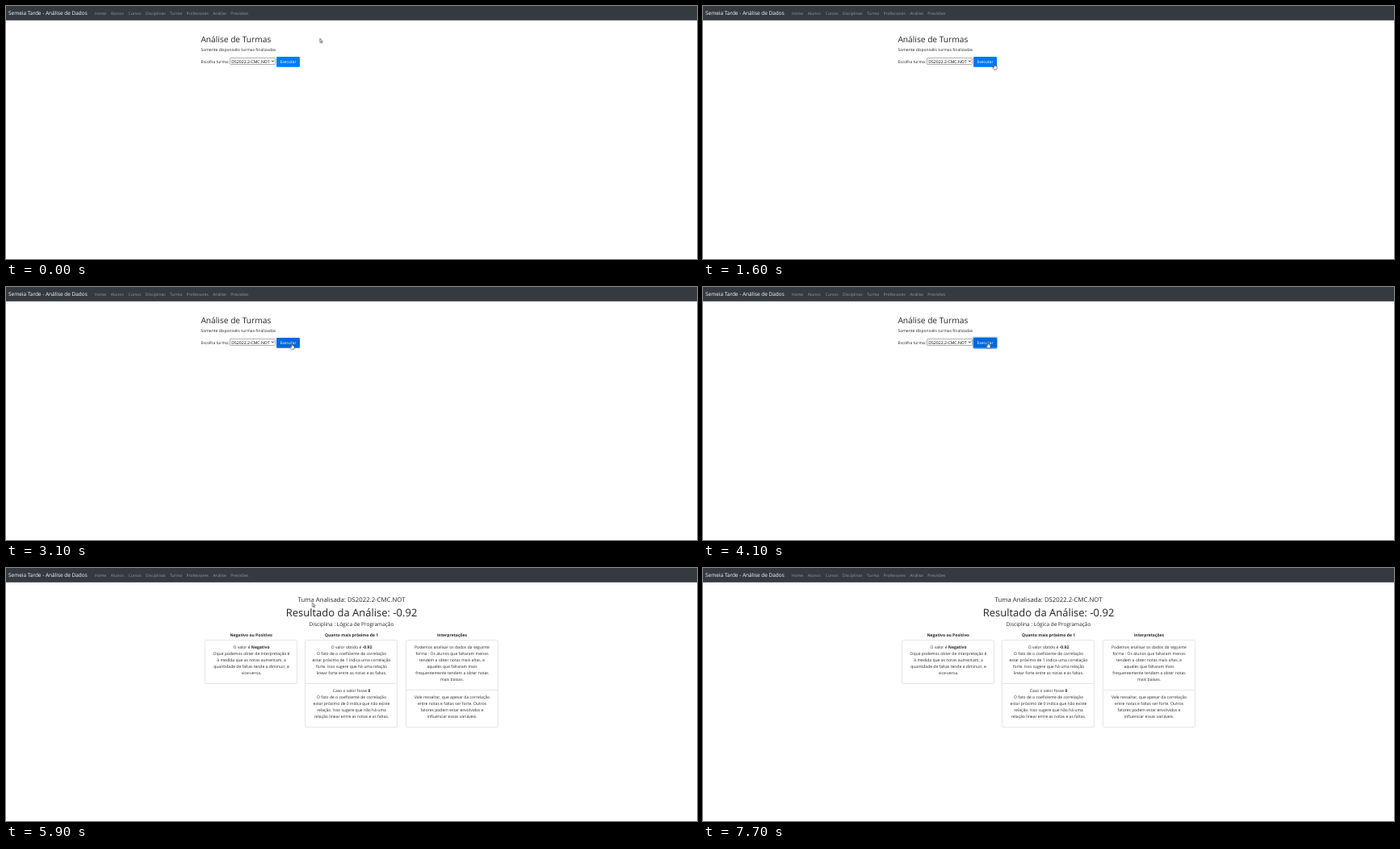
Recreate the animation shown at these times as an HTML page. Size 856x314 px, loop 7800 ms.

```html
<!DOCTYPE html>
<html lang="pt-BR">
<head>
<meta charset="utf-8">
<title>Análise de Turmas</title>
<style>
  html, body { margin: 0; width: 100%; height: 100%; overflow: hidden; background: #fff; }
  svg { display: block; width: 856px; height: 314px; }
  text { font: 5.04px "Open Sans", "Noto Sans", sans-serif; fill: #212529; text-rendering: geometricPrecision; }

  .brand { font-size: 6.47px; fill: #fff; }
  .nav text { font-size: 5px; fill: #999c9f; }
  .h1 { font-size: 13px; font-weight: 500; }
  .h2 { font-size: 10.2px; font-weight: 500; }
  .h4 { font-size: 7.78px; font-weight: 500; }
  .h5 { font-size: 6.5px; font-weight: 500; }
  .option { font-size: 5.13px; fill: #000; }
  .label { font-size: 4.98px; fill: #fff; }
  .mid text { text-anchor: middle; }
  .bold, .mid tspan { font-weight: 700; }
  .box { fill: #fff; stroke: #e6e6e6; }

  /* One loop is 7800 ms; the pointer moves on a 100 ms beat. */
  .form, .result, .button, .ring, .arrow, .hand { animation: 7.8s step-end infinite; }
  .form { animation-name: form; }
  .result { animation-name: result; }
  .button { animation-name: button; }
  .ring { animation-name: ring; }
  .arrow { animation-name: arrow; }
  .hand { animation-name: hand; }
  .pointer { animation: move 7.8s step-end infinite; }

  @keyframes form { 0% { visibility: visible; } 58.974%, 100% { visibility: hidden; } }
  @keyframes result { 0% { visibility: hidden; } 58.974%, 100% { visibility: visible; } }
  @keyframes button {
    0% { fill: #007bff; }
    20.512% { fill: #0077f4; }
    21.794% { fill: #006fe5; }
    23.076% { fill: #0069d9; }
    48.717% { fill: #0062cc; }
    51.282%, 100% { fill: #0069d9; }
  }
  @keyframes ring {
    0% { opacity: 0; }
    48.717% { opacity: .25; }
    50% { opacity: .5; }
    58.974%, 100% { opacity: 0; }
  }
  @keyframes arrow {
    0% { visibility: visible; }
    20.512% { visibility: hidden; }
    73.076% { visibility: visible; }
    87.179%, 100% { visibility: hidden; }
  }
  @keyframes hand {
    0% { visibility: hidden; }
    20.512% { visibility: visible; }
    73.076%, 100% { visibility: hidden; }
  }
  @keyframes move {
    0% { transform: translate(388.6px, 40px); }
    11.538% { transform: translate(388.6px, 40px); animation-timing-function: steps(8, jump-start); }
    21.794% { transform: translate(361px, 71.3px); animation-timing-function: steps(2, jump-start); }
    24.358% { transform: translate(360.5px, 73px); }
    25.641% { transform: translate(360.5px, 73px); animation-timing-function: steps(5, jump-start); }
    32.051% { transform: translate(354px, 69.6px); }
    48.717% { transform: translate(354px, 69.6px); animation-timing-function: steps(4, jump-start); }
    53.846% { transform: translate(352.8px, 68.2px); }
    73.076% { transform: translate(352.8px, 68.2px); animation-timing-function: steps(6, jump-start); }
    80.769% { transform: translate(406px, 17.5px); }
    83.333%, 100% { transform: translate(407.6px, 17.5px); }
  }
</style>
</head>
<body>
<svg viewBox="0 0 856 314">
  <rect width="856" height="17.8" fill="#343a40"/>
  <text class="brand" x="3" y="11.1">Semeia Tarde - Análise de Dados</text>
  <g class="nav">
    <text x="110" y="10.5">Home</text>
    <text x="129.8" y="10.5">Alunos</text>
    <text x="151.5" y="10.5">Cursos</text>
    <text x="172.9" y="10.5">Disciplinas</text>
    <text x="203" y="10.5">Turma</text>
    <text x="223.6" y="10.5">Professores</text>
    <text x="256.2" y="10.5">Análise</text>
    <text x="278.3" y="10.5">Previsões</text>
  </g>

  <g class="form">
    <text class="h2" x="241.4" y="44.8">Análise de Turmas</text>
    <text x="241.4" y="55.5">Somente disponivéis turmas finalizadas</text>
    <text x="241.4" y="70.6">Escolha turma:</text>
    <rect x="277.5" y="64.5" width="56" height="8" rx=".8" fill="#fff" stroke="#767676" stroke-width=".6"/>
    <text class="option" x="279.3" y="70.5">DS2022.2-CMC.NOT</text>
    <path d="M329 67.6 330.4 69.1 331.8 67.6" fill="none" stroke="#000" stroke-width=".9"/>
    <rect class="ring" x="334.4" y="62.4" width="30.2" height="14" rx="1.9" fill="none" stroke="#007bff" stroke-width="1.1"/>
    <rect class="button" x="335" y="63" width="29" height="12.8" rx="1.3"/>
    <text class="label" x="339.4" y="71.3">Executar</text>
  </g>

  <g class="result">
    <g class="mid" transform="translate(428 0)">
      <text class="h4" y="41.9">Tuma Analisada: DS2022.2-CMC.NOT</text>
      <text class="h1" y="60">Resultado da Análise: -0.92</text>
      <text class="h5" y="71.9">Disciplina : Lógica de Programação</text>
    </g>

    <g class="mid" transform="translate(304 0)">
      <text class="bold" y="84.8">Negativo ou Positivo:</text>
      <rect class="box" x="-57.5" y="89.5" width="114" height="54" rx="1.3"/>
      <text y="99.9">O valor é <tspan>Negativo</tspan></text>
      <text y="107.9">Oque podemos obter de interpretação é</text>
      <text y="115.9">à medida que as notas aumentam, a</text>
      <text y="124">quantidade de faltas tende a diminuir, e</text>
      <text y="132">vice-versa.</text>
    </g>

    <g class="mid" transform="translate(428 0)">
      <text class="bold" y="84.8">Quanto mais próximo de 1</text>
      <rect class="box" x="-57.5" y="89.5" width="114" height="108" rx="1.3"/>
      <path class="box" d="M-57.5 143.5h114"/>
      <text y="99.9">O valor obtido é <tspan>-0.92</tspan></text>
      <text y="107.9">O fato de o coeficiente de correlação</text>
      <text y="115.9">estar próximo de 1 indica uma correlação</text>
      <text y="124">forte. Isso sugere que há uma relação</text>
      <text y="132">linear forte entre as notas e as faltas.</text>
      <text y="153.9">Caso o valor fosse <tspan>0</tspan></text>
      <text y="161.9">O fato de o coeficiente de correlação</text>
      <text y="169.9">estar próximo de 0 indica que não existe</text>
      <text y="178">relação. Isso sugere que não há uma</text>
      <text y="186">relação linear entre as notas e as faltas.</text>
    </g>

    <g class="mid" transform="translate(552.5 0)">
      <text class="bold" y="84.8">Interpretações</text>
      <rect class="box" x="-57" y="89.5" width="114" height="108" rx="1.3"/>
      <path class="box" d="M-57 151.5h114"/>
      <text y="99.9">Podemos analisar os dados da seguinte</text>
      <text y="107.9">forma : Os alunos que faltaram menos</text>
      <text y="115.9">tendem a obter notas mais altas, e</text>
      <text y="124">aqueles que faltaram mais</text>
      <text y="132">frequentemente tendem a obter notas</text>
      <text y="140">mais baixas.</text>
      <text y="161.9">Vale ressaltar, que apesar da correlação</text>
      <text y="169.9">entre notas e faltas ser forte. Outros</text>
      <text y="178">fatores podem estar envolvidos e</text>
      <text y="186">influenciar essas variáveis.</text>
    </g>
  </g>

  <g class="pointer" fill="#fff" stroke="#000" stroke-width=".5" stroke-linejoin="round">
    <path class="arrow" d="M.2 .2V5.3L1.4 4.2 2.2 6.2 3 5.8 2.2 3.9H3.7Z"/>
    <path class="hand" d="M-.6 .9Q0-.1 .6 .9V3Q1.2 2.6 1.6 3.2 2.2 2.9 2.5 3.5 3.3 3.3 3.3 4.2V5.7L2.6 7.8H-.5L-2.2 5.2Q-2.5 4.2-1.5 4.4L-.6 5.2Z"/>
  </g>
</svg>
</body>
</html>
```
